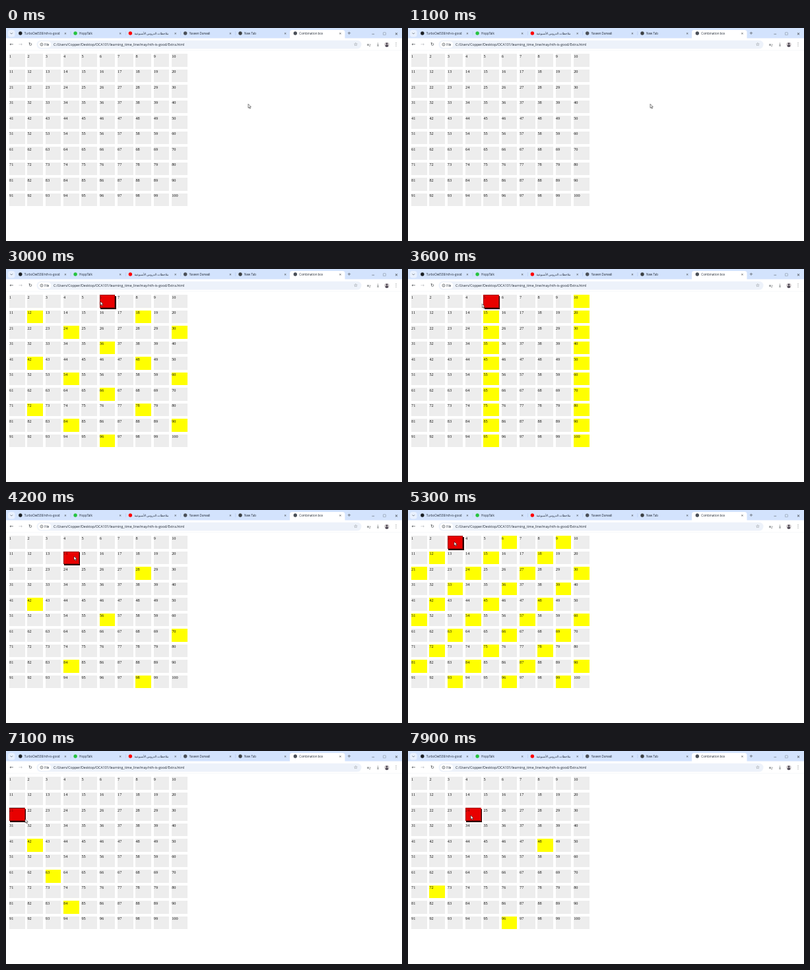
Write an HTML page that moves like this. It is 600 px wide and 323 px high and loops after 8000 ms.

```html
<!DOCTYPE html>
<html lang="en">
<head>
<meta charset="utf-8">
<title>Combination box</title>
<style>
  html, body { margin: 0; width: 100%; height: 100%; overflow: hidden; background: #fff; }
  svg { display: block; width: 100%; height: 100%; }
  text { font: 4.5px "Open Sans", "Noto Sans", sans-serif; fill: #1f2733; }
  .url { font-size: 5.21px; }
  .icon { font-family: "DejaVu Sans", sans-serif; text-anchor: middle; dominant-baseline: central; fill: #3c4043; }
  .cell { shape-rendering: crispEdges; }
  .cell text { font: 6.25px "Liberation Serif", serif; fill: #111; }
  #hover text { fill: #700; }
</style>
</head>
<body>
<svg viewBox="0 0 600 323">
  <rect width="600" height="16" fill="#d3e3fd"/>
  <rect x="3" y="3" width="10.5" height="10.5" rx="3.5" fill="#e9f1fe"/>
  <path d="M6.6 7.4l1.7 1.7 1.7-1.7" fill="none" stroke="#3c4043" stroke-width=".65"/>
  <rect x="430" y="3" width="83.5" height="16" rx="3.5" fill="#fff"/>
  <rect y="15.5" width="600" height="18.5" fill="#fff"/>
  <rect y="33.8" width="600" height=".4" fill="#e4e8ee"/>
  <rect x="46.5" y="18.7" width="492" height="12.8" rx="6.4" fill="#edf2fa"/>
  <rect x="48.5" y="20.3" width="20" height="9.6" rx="4.8" fill="#fff"/>
  <circle cx="54" cy="25" r="2.1" fill="none" stroke="#3c4043" stroke-width=".6"/>
  <path d="M54 23.5v.6m0 .6v1.4" stroke="#3c4043" stroke-width=".6"/>
  <text x="58.2" y="26.7">File</text>
  <text class="url" x="72" y="26.9">C:/Users/Copper/Desktop/OCA101/learning_time_line/may/nth-is-good/Extra.html</text>
  <circle cx="577" cy="25" r="3.6" fill="#c9c3c6"/>
  <circle cx="577" cy="23.8" r="1.3" fill="#463f4c"/>
  <path d="M574.6 27.7a2.4 2.3 0 0 1 4.8 0a3.6 3.6 0 0 1-4.8 0" fill="#463f4c"/>
  <g id="chrome"></g>
  <g id="cells" class="cell"></g>
  <g id="hover" class="cell">
    <rect x="1.3" y="1.3" width="23.5" height="20" fill="#2a0000"/>
    <rect width="23.44" height="19.57" fill="#e80000"/>
    <rect x=".4" y=".4" width="22.6" height="18.7" fill="none" stroke="#300" stroke-width=".8" stroke-dasharray="1.2 .8"/>
    <text y="5.7"></text>
  </g>
  <path id="cursor" d="M0 0v6l1.4-1.2 1 2.2 1-.5-1-2.1h1.9z" fill="#fff" stroke="#000" stroke-width=".5"/>
</svg>
<script>
const $ = id => document.getElementById(id);
const LOOP = 8000, STEP = 100, LAG = .1;
const W = 23.44, H = 19.57, DX = 27.34, DY = 23.5, X0 = 5.08, Y0 = 39.2;

const icon = (glyph, x, y, size = 7, color = '#3c4043') =>
  `<text class="icon" x="${x}" y="${y}" style="font-size:${size}px;fill:${color}">${glyph}</text>`;
const dot = (x, color) => `<circle cx="${x}" cy="8" r="2.7" fill="${color}"/>`;

// Tabs are evenly spaced: favicon colour, label
const tabs = [
  ['#1b1f24', 'TurboOwl538/nth-is-good'],
  ['#25c33f', 'HoppTalk'],
  ['#f00', 'ملاحظات الدروس الأسبوعية'],
  ['#4a4f57', 'Yaseen Darwali'],
  ['#3c4043', 'New Tab'],
  ['#4a4f57', 'Combination box']
].map(([color, label], i) => {
  const x = 21.8 + 83.3 * i;
  const divider = i < 4 ? `<rect x="${x + 76}" y="5" width=".4" height="6" fill="#a3bde8"/>` : '';
  return dot(x, color) + `<text x="${x + 6}" y="9.7">${label}</text>` + icon('✕', x + 68.2, 8, 4.6) + divider;
});

$('chrome').innerHTML = tabs.join('') +
  icon('+', 520, 8) + icon('−', 556.3, 8, 6) + icon('□', 573.4, 8, 5) + icon('✕', 591.5, 8, 6) +
  icon('←', 8.5, 25) + icon('→', 22, 25, 7, '#b5b8bc') + icon('↻', 37, 25) +
  icon('☆', 530, 25) + icon('≡', 548.5, 24.5, 5) + icon('♪', 551.5, 25.5, 5) +
  icon('⤓', 563.5, 25) + icon('⋮', 591, 25);

const cellX = n => X0 + (n - 1) % 10 * DX;
const cellY = n => Y0 + Math.floor((n - 1) / 10) * DY;
const numbers = Array.from({ length: 100 }, (_, i) => i + 1);
$('cells').innerHTML = numbers.map(n =>
  `<rect x="${cellX(n)}" y="${cellY(n)}" width="${W}" height="${H}"/>
   <text x="${cellX(n)}" y="${cellY(n) + 5.7}">${n}</text>`).join('');
const rects = $('cells').querySelectorAll('rect');
const hoverLabel = $('hover').querySelector('text');

// Key points of the pointer: seconds, x, y
const path = [
  [0, 367, 115.3], [1.7, 367, 115.3], [1.9, 241, 91], [2, 231, 81], [2.35, 226, 52],
  [3, 143, 49], [3.8, 102, 54], [4.2, 103, 70], [4.7, 72, 68], [5.3, 70, 48],
  [6.1, 43, 60], [6.7, 18, 80], [7.1, 29, 103], [7.8, 95, 97.5], [8, 95, 97.5]
];

function pointer(t) {
  const i = Math.max(1, path.findIndex(p => p[0] >= t));
  const [t0, x0, y0] = path[i - 1], [t1, x1, y1] = path[i];
  const k = (t - t0) / (t1 - t0);
  return [x0 + (x1 - x0) * k, y0 + (y1 - y0) * k];
}

const cellAt = ([x, y]) => numbers.find(n =>
  x >= cellX(n) && x <= cellX(n) + W && y >= cellY(n) && y <= cellY(n) + H);

function draw(now) {
  const t = Math.floor(now % LOOP / STEP) * STEP / 1000;
  // The page reacts slightly after the pointer
  const hot = cellAt(pointer(Math.max(0, t - LAG)));
  rects.forEach((r, i) => r.setAttribute('fill', hot && (i + 1) % hot === 0 ? '#ff0' : '#ededed'));
  $('hover').style.display = hot ? 'block' : 'none';
  if (hot) {
    $('hover').setAttribute('transform', `translate(${cellX(hot)} ${cellY(hot)})`);
    hoverLabel.textContent = hot;
  }
  $('cursor').setAttribute('transform', `translate(${pointer(t)})`);
  requestAnimationFrame(draw);
}
requestAnimationFrame(draw);
</script>
</body>
</html>
```
